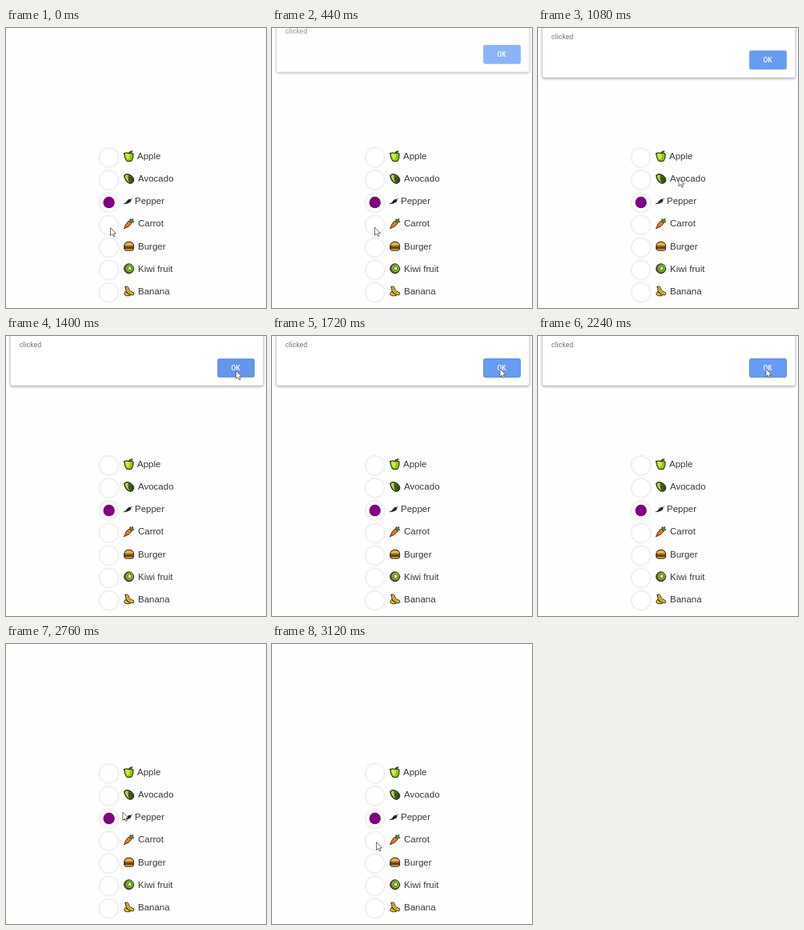
An HTML page that plays this animation: 325x350 px, repeating every 3280 ms.

```html
<!DOCTYPE html>
<html lang="en">
<head>
<meta charset="utf-8">
<title>Radio list with alert</title>
<style>
  html, body { margin: 0; width: 100%; height: 100%; overflow: hidden; background: #fefefe; }
  svg { display: block; width: 325px; height: 350px; }
  .label { font: 11.5px "Liberation Sans", Arial, sans-serif; fill: #3a3a3a; }
  .ring { fill: #fff; stroke: #eee; filter: drop-shadow(0 .6px 1px rgba(0, 0, 0, .14)); }
  .icon { stroke: #1d1d14; stroke-width: 1; stroke-linejoin: round; stroke-linecap: round; }
  .icon .plain { stroke: none; }
  .box { fill: #fff; stroke: #d6d6d6; stroke-width: .7; filter: drop-shadow(0 1px 1.5px rgba(0, 0, 0, .36)); }
  .message { font: 8.8px Roboto, sans-serif; fill: #777; }
  .ok { font: 500 8.4px Roboto, sans-serif; fill: #fff; text-anchor: middle; }
</style>
</head>
<body>
<svg viewBox="0 0 325 350">
  <g id="list"></g>
  <g id="dialog">
    <rect class="box" x="5.5" y="-40" width="316" height="102" rx="2"/>
    <text class="message" x="16.7" y="14.3">clicked</text>
    <rect id="button" x="264.5" y="28.5" width="46" height="23" rx="2"/>
    <text class="ok" x="287" y="43.1">OK</text>
  </g>
  <path id="cursor" d="M0 0V10L2.3 8L4 11.5L5.6 10.7L4 7.4H7Z"
        fill="#fff" stroke="#606060" stroke-width=".9" stroke-linejoin="round"/>
</svg>
<script>
const $ = id => document.getElementById(id);

// Icons are drawn around their own centre, about 13 px wide.
const items = [
  ['Apple', 164, `
    <path fill="#8fc412" d="M-6-3.6Q-3-5.2 0-3.6Q3-5 5.4-3Q6 2 3.4 6Q0 6.8-3 6Q-6 2-6-3.6Z"/>
    <path class="plain" fill="#c9e93b" d="M-4.7-2.6Q-2-3.8 1.5-2Q1.6 2-1 4.6Q-4.6 2-4.7-2.6Z"/>
    <path fill="#6a9a18" stroke-width=".8" d="M0-3.7Q0-6.5 4.4-6.4Q4-4 0-3.7Z"/>`],
  ['Avocado', 165, `
    <path fill="#2f6b1e" d="M-5.8-4Q-4.6-6.5-1-5.6Q4.6-4.2 6 .4Q6.6 5 2.4 6Q-2 6-4.2 1.8Q-6.3-1.2-5.8-4Z"/>
    <path class="plain" fill="#b5d34b" d="M-4.9-3.7Q-3.4-5.3-1-4.4Q-2 0 1 4.6Q-2 4-3.6.8Q-5.2-1.6-4.9-3.7Z"/>
    <circle fill="#8a4b20" stroke-width=".7" cx="2" cy="1.6" r="2.2"/>`],
  ['Pepper', 161, `
    <path fill="#242424" stroke-width=".5" d="M-6.4 3.4Q-3.4 2.4-2.2-.4Q-.6-2.8 2-2.4Q3.2-.6 1.6 1Q-1.8 3.4-6.4 3.4Z"/>
    <path fill="none" stroke-width=".8" d="M1.8-1.7L3.8-3.2"/>`],
  ['Carrot', 165, `
    <path fill="#4aa52e" stroke-width=".7" d="M1-2.4L1.3-6L3.2-4.7L5-6.3L5-3.7L6.2-2L2.6-1Z"/>
    <path fill="#f47b20" stroke-width=".8" d="M-6 6Q-4.4 0-.8-3Q2.2-3.6 3.2-.4Q1 4-6 6Z"/>
    <path stroke="#a94f12" stroke-width=".7" d="M-2 0L-.4 1.2M-3.6 2.6L-2.2 3.5"/>`],
  ['Burger', 165, `
    <path fill="#f0ab38" d="M-6-.2Q-5.6-5.4 0-5.4Q5.6-5.4 6-.2Z"/>
    <path fill="#e9a02e" d="M-6 2.4H6Q5.8 5.4 3.8 5.4H-3.8Q-5.8 5.4-6 2.4Z"/>
    <rect fill="#74391c" stroke-width=".6" x="-6.2" y=".2" width="12.4" height="2.2" rx="1"/>
    <path fill="none" stroke="#c9b833" stroke-width=".7" d="M-4.5.5H4.5"/>`],
  ['Kiwi fruit', 165, `
    <circle fill="#80552a" r="6"/>
    <circle class="plain" fill="#80bd2e" cx=".9" cy="-.6" r="4.7"/>
    <circle fill="none" stroke="#35541a" stroke-width=".8" stroke-dasharray=".7 1.5" cx=".9" cy="-.5" r="2.8"/>
    <ellipse class="plain" fill="#eef2c4" cx=".9" cy="-.5" rx="1.5" ry="1.9"/>`],
  ['Banana', 165, `
    <path fill="#f4c62c" stroke-width=".9" d="M-4.6-5.4L-2.2-6Q0-4.8.2-2Q1 .6 5.6 1.6Q6.8 3.4 5.4 4.8Q1.4 5.4-1.6 2.6Q-4.6-.6-4.6-5.4Z"/>
    <path fill="#f4c62c" stroke-width=".9" d="M-4.4.6Q-6.2 2.2-5.8 4.4Q-3 6.8 1.4 5.6L1.6 4.2Q-2.2 3.4-4.4.6Z"/>
    <path fill="none" stroke="#7a5d10" stroke-width=".7" d="M-2.6-4Q-2 .4 2.6 2.8"/>`]
];

$('list').innerHTML = items.map(([name, x, icon], i) => {
  const y = 160.2 + 28.12 * i;
  const dot = name === 'Pepper' ? `<circle cx="128.7" cy="${y + 1.6}" r="7.2" fill="#800080"/>` : '';
  return `<circle class="ring" cx="128.7" cy="${y + 1.7}" r="11.6"/>${dot}
    <g class="icon" transform="translate(153.7 ${y})">${icon}</g>
    <text class="label" x="${x}" y="${y + 3.9}">${name}</text>`;
}).join('');

const LOOP = 3280;
const clamp = v => Math.min(1, Math.max(0, v));
const span = (t, from, to) => clamp((t - from) / (to - from));
const smooth = u => u * u * (3 - 2 * u);
const easeOut = u => 1 - (1 - u) ** 2;

// Each leg: start time, end time, destination, easing.
const legs = [
  [110, 160, 128.5, 249, smooth],
  [900, 1400, 287.5, 43.5, smooth],
  [1500, 1520, 285, 41, smooth],
  [2490, 2760, 146, 210, smooth],
  [2760, 3120, 130.5, 247.5, easeOut]
];

function cursorAt(t) {
  let x = 130.5, y = 249.5;
  for (const [from, to, toX, toY, ease] of legs) {
    const k = ease(span(t, from, to));
    x += (toX - x) * k;
    y += (toY - y) * k;
  }
  return [x, y];
}

function draw(t) {
  const enter = easeOut(span(t, 300, 580));
  const leave = span(t, 2280, 2500);
  const shift = -28 * (1 - enter) - 13 * leave;
  $('dialog').setAttribute('transform', `translate(${3 * leave} ${shift})`);
  $('dialog').setAttribute('opacity', t < 320 ? 0 : enter * (1 - leave));

  const [x, y] = cursorAt(t);
  $('cursor').setAttribute('transform', `translate(${x} ${y})`);
  const hover = x > 264 && y < 52;
  const focused = t >= 1520;
  $('button').setAttribute('fill', hover && !focused ? '#6595e9' : '#679bf4');
  $('button').setAttribute('stroke', focused ? '#5a8de6' : '#76a5f5');
}

function tick() {
  draw(performance.now() % LOOP);
  requestAnimationFrame(tick);
}
tick();
</script>
</body>
</html>
```
